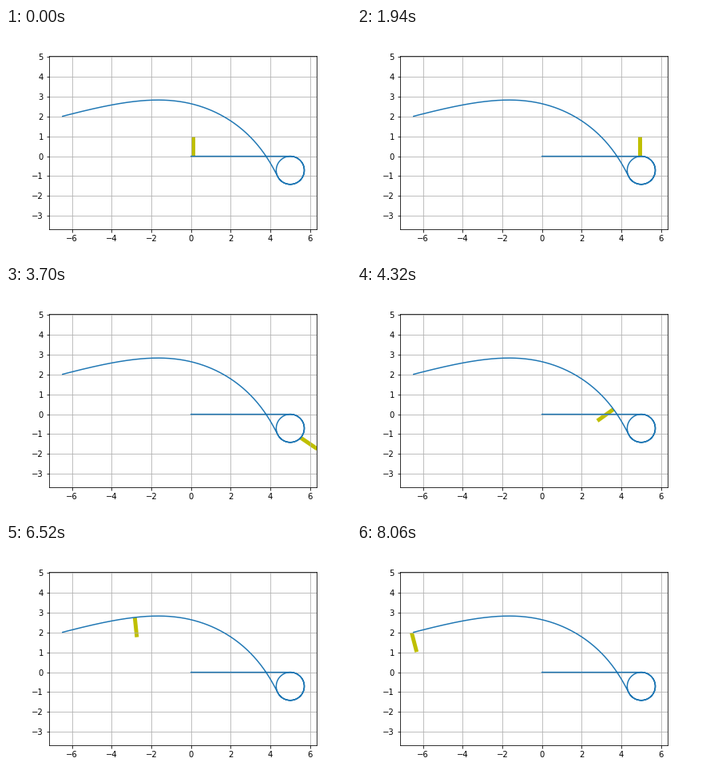
Recreate the animation shown at these times as a matplotlib script. Size 432 by 288 pixels, loop 8.08 s.

```python
import numpy as np
import matplotlib.pyplot as plt
from matplotlib.animation import FuncAnimation
from matplotlib.patches import Rectangle

N = 404                 # frames in one loop
R = np.sqrt(0.5)        # loop radius
TURN = 603              # degrees turned in the loop
SPIN = 3.797            # turn rate on entering the loop


def run(t):
    """Straight run at constant speed."""
    return 0.05 * t, 0 * t, 0 * t


def loop(t):
    """Clockwise loop with steady angular acceleration over 100 steps."""
    turn = SPIN * t + (TURN - 100 * SPIN) * (t / 100) ** 2
    phi = np.radians(turn)
    return 5 + R * np.sin(phi), R * (np.cos(phi) - 1), -turn


def heading(t):
    """Flight direction in degrees, easing towards a shallow descent."""
    start = 720 - TURN
    return start + 79 * (1 - np.exp(-(t / 75) ** 1.4))


def speed(t):
    """Flight speed, slowing smoothly to its cruising value."""
    return 0.0495 + 0.0385 / (1 + np.exp((t - 63) / 14))


def flight(t):
    """Integrate speed along the heading from the end of the loop."""
    x0, y0, _ = loop(100)
    mid = t[:-1] + 0.5
    a = np.radians(heading(mid))
    x = x0 + np.append(0, np.cumsum(speed(mid) * np.cos(a)))
    y = y0 + np.append(0, np.cumsum(speed(mid) * np.sin(a)))
    return x, y, heading(t)


step = np.arange(N)
xs, ys, angles = np.hstack([
    run(step[:100]),
    loop(step[:100]),
    flight(step[:N - 200]),
])

fig = plt.figure(figsize=(6, 4), dpi=72, facecolor="white")
fig.subplots_adjust(left=0.125, right=0.9, bottom=0.125, top=0.88)
ax = fig.add_subplot()
ax.plot(xs, ys, color="C0", lw=1.5)
ax.grid(True)
ax.set(xlim=(-7.151, 6.322), ylim=(-3.678, 5.072),
       xticks=range(-6, 7, 2), yticks=range(-3, 6))

body = ax.add_patch(Rectangle((0, 0), 0.2, 1, fc="y"))


def update(i):
    body.set_xy((xs[i], ys[i]))
    body.set_angle(angles[i])
    return (body,)


anim = FuncAnimation(fig, update, frames=N, interval=20, repeat=True,
                     repeat_delay=0, blit=False)
plt.show()
```
